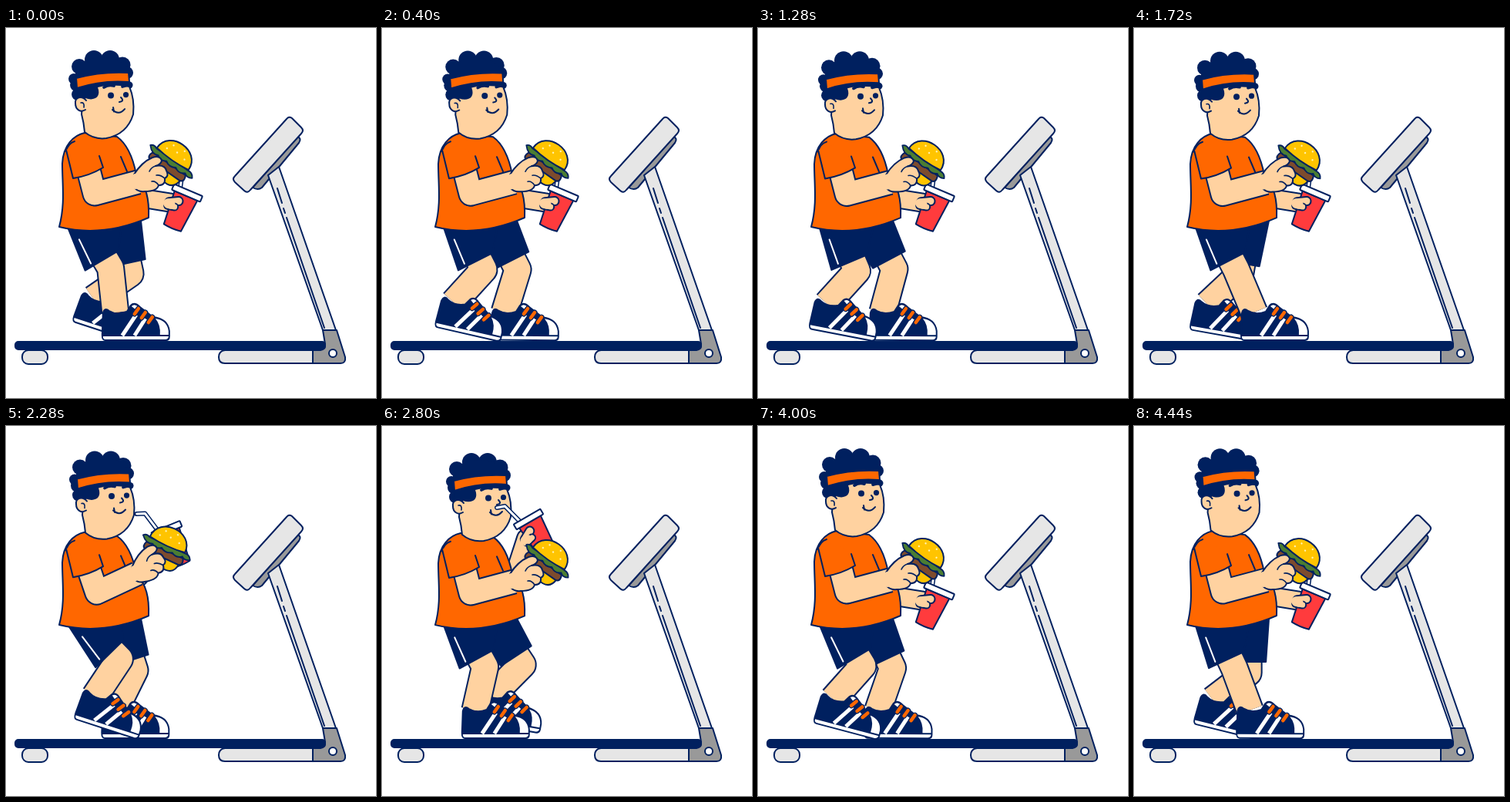
Animation, 480 px wide and 480 px high, one loop 4.48 s. Source, as an HTML page with a canvas:

```html
<!DOCTYPE html>
<html lang="en">
<head>
<meta charset="utf-8">
<title>Treadmill snack</title>
<style>
html, body { margin: 0; height: 100%; overflow: hidden; background: #fff; }
canvas { display: block; width: 100vw; height: 100vh; }
</style>
</head>
<body>
<canvas width="480" height="480"></canvas>
<script>
const ctx = document.querySelector('canvas').getContext('2d');
const LOOP = 4480, STEP = LOOP / 5, GROUND = 405;
const NAVY = '#00205f', ORANGE = '#ff6700', SKIN = '#ffd2a0', PALE = '#e6e6e6',
  GREY = '#999', RED = '#ff3b3d', YELLOW = '#ffc400', GREEN = '#4b7d32', BROWN = '#7d4b2d', WHITE = '#fff';
const THIGH = 62, SHIN = 58;

// phase, heel x, heel tilt in degrees, lift
const FOOT = [[0, 124, 0, 0], [.125, 103, 0, 0], [.25, 81, 0, 0], [.34, 68, 4, 0], [.42, 63, 10, 0],
  [.5, 74, 18, 0], [.545, 83, 18, 1], [.625, 109, 10, 8], [.75, 135, -2, 9], [.85, 143, -6, 3], [.92, 138, 0, 0]];
// phase within one step, head x and y
const HEAD = [[0, 0, 0], [.09, 1, 3.5], [.25, 2, 6], [.5, 0, 5], [.7, -2, 3.5], [.84, -3, 1.7], [.91, -2.5, .3]];

// periodic cubic through the keys
function spline(keys, p) {
  const n = keys.length;
  const key = j => keys[(j + n) % n].map((v, c) => c ? v : v + Math.floor(j / n));
  const i = keys.findLastIndex(k => k[0] <= p);
  const [a, b, c, d] = [i - 1, i, i + 1, i + 2].map(key);
  const h = c[0] - b[0], s = (p - b[0]) / h;
  return b.slice(1).map((v, j) => {
    const k = j + 1;
    const m0 = h * (c[k] - a[k]) / (c[0] - a[0]), m1 = h * (d[k] - b[k]) / (d[0] - b[0]);
    const q = c[k] - v;
    return v + m0 * s + (3 * q - 2 * m0 - m1) * s * s + (m0 + m1 - 2 * q) * s ** 3;
  });
}

const rad = deg => deg * Math.PI / 180;
const mix = (a, b, p) => a + (b - a) * p;
const clamp = x => Math.max(0, Math.min(1, x));
const ease = x => { x = clamp(x); return x * x * (3 - 2 * x); };

function turn([x, y], deg) {
  const c = Math.cos(rad(deg)), s = Math.sin(rad(deg));
  return [x * c - y * s, x * s + y * c];
}

function shape(d, fill, width = 2, color = NAVY) {
  const path = new Path2D(d);
  if (fill) { ctx.fillStyle = fill; ctx.fill(path); }
  if (width) { ctx.lineWidth = width; ctx.strokeStyle = color; ctx.stroke(path); }
}
const poly = pts => 'M' + pts.map(p => p.join()).join('L');
const dot = (x, y, r, fill, width = 0) =>
  shape(`M${x - r},${y}a${r},${r} 0 1 1 ${2 * r},0a${r},${r} 0 1 1 ${-2 * r},0Z`, fill, width);

function limb(pts, width, cap = 'butt') {
  ctx.lineCap = cap;
  shape(poly(pts), null, width + 4);
  shape(poly(pts), null, width, SKIN);
  ctx.lineCap = 'round';
}

function at(x, y, deg, draw) {
  ctx.save();
  ctx.translate(x, y);
  ctx.rotate(rad(deg));
  draw();
  ctx.restore();
}

function box(x, y, w, h, r, fill) {
  const path = new Path2D();
  path.roundRect(x, y, w, h, r);
  ctx.fillStyle = fill; ctx.fill(path);
  ctx.lineWidth = 2; ctx.strokeStyle = NAVY; ctx.stroke(path);
}

function treadmill() {
  shape('M378,141Q384,143 380,149L332,207Q327,211 320,207Z', GREY);
  shape('M340,191L354,180L428,392H411Z', PALE);
  shape('M352,208L358,227M360,234L362,240M364,246L413,389', null);
  shape('M364,118Q367,114 371,117L383,129Q387,133 383,137L317,210Q313,215 309,211L297,200Q293,196 297,192Z', PALE);
  box(21, 418, 33, 18, 8, PALE);
  shape('M398,418V435H284Q276,435 276,427T284,418Z', PALE);
  shape('M398,418H408Q414,417 414,410L411,392H429L440,427Q441,435 434,435H398Z', GREY);
  dot(424, 422, 5, WHITE, 2);
  box(12, 407, 402, 10, 4, NAVY);
}

function shoe() {
  shape('M1,-7L2,-35Q4,-43 10,-38Q20,-32 33,-37L38,-45Q43,-50 50,-43L67,-30Q86,-28 88,-12V-5Q88,0 84,0H5Q1,0 1,-7Z', NAVY);
  shape('M39,-44Q43,-48 48,-43L44,-40Z', WHITE, 0);
  shape('M70,-28Q85,-26 87,-12V-7H76Q77,-20 70,-28Z', WHITE, 0);
  shape('M2,-5H87V-4Q86,-1 83,-1H5Q2,-1 2,-5Z', WHITE, 0);
  ctx.lineCap = 'butt';
  shape('M45,-33L27,-6M57,-28L43,-6', null, 5, WHITE);
  ctx.lineCap = 'round';
  shape('M48,-41L43,-34M57,-36L52,-29M66,-30L61,-23', null, 7);
  shape('M48,-41L43,-34M57,-36L52,-29M66,-30L61,-23', null, 4.5, ORANGE);
}

function leg(phase, hip, shift, waist, back, front, stripe) {
  const [x, tilt, lift] = spline(FOOT, phase);
  const toe = [x + shift + 80, GROUND - lift];
  const off = turn([-62, -36], tilt);
  const ankle = [toe[0] + off[0], toe[1] + off[1]];
  const dx = ankle[0] - hip[0], dy = ankle[1] - hip[1];
  const d = Math.min(Math.hypot(dx, dy), THIGH + SHIN - .1);
  const bend = Math.acos((THIGH ** 2 + d * d - SHIN ** 2) / (2 * THIGH * d));
  const a = Math.atan2(dx, dy) + bend;
  const ux = Math.sin(a), uy = Math.cos(a);
  // along the thigh, then across it towards the front
  const point = (l, w) => [hip[0] + ux * l + uy * w, hip[1] + uy * l - ux * w];

  limb([hip, point(THIGH, 0), ankle], 33);
  at(...toe, tilt, () => { ctx.translate(-80, 0); shoe(); });
  shape(poly([waist[0], point(48, back), point(48, front), waist[1]]) + 'Z', NAVY);
  if (stripe) {
    const [ex, ey] = point(44, -19);
    shape(poly([[mix(86, ex, .37), mix(256, ey, .37)], [ex, ey]]), null, 2, WHITE);
  }
}

function torso() {
  shape('M102,136C88,139 74,152 73,176C73,204 77,228 69,258Q126,272 185,246C186,222 182,205 169,190Q162,154 144,141Z', ORANGE);
  shape('M78,160Q80,150 89,147M149,167L157,186', null);
}

function head() {
  for (const [x, y, r] of [[95, 50, 10], [114, 41, 12], [135, 41, 12], [151, 48, 10.5],
    [157, 58, 8], [88, 66, 7], [91, 74, 8], [93, 86, 8], [160, 74, 4.5]]) dot(x, y, r, NAVY);
  shape('M90,84V55Q100,38 125,38T160,58V80Z', NAVY, 0);
  shape('M99,96L98,112Q101,123 102,135Q114,145 130,143Q157,138 165,112Q167,92 160,76Q140,71 112,76Z', SKIN);
  shape('M92,76Q125,67 161,70V76Q140,71 119,77C124,90 114,95 103,91L93,92Z', NAVY, 0);
  shape('M104,94C98,87 89,90 90,98C90,106 97,110 103,106', SKIN);
  shape('M97,97Q102,96 101,103', null, 1.6);
  shape('M91,65Q124,56 159,58L160,70Q125,67 92,78Z', ORANGE);
  dot(136, 87.5, 4, NAVY);
  dot(155.5, 86.5, 3.6, NAVY);
  shape('M127,77Q133,73 140,75M151,76L160,73.5', null, 3.8);
  shape('M149,90Q154,95 147,96M139,103L140,108.5M138,106Q146,114 154,105', null, 2);
}

function cup() {
  const straw = 'M-11,-3L-18,-30L-28,-33.5';
  shape(straw, null, 6);
  shape(straw, null, 3, WHITE);
  shape('M-16,4L-12,49Q0,51 12,49L16,4Z', RED);
  box(-20, -4, 40, 8, 1, WHITE);
  limb([[-17, 20], [-6, 14]], 9, 'round');
  limb([[-17, 25], [-8, 23]], 7, 'round');
  shape('M-18,22H-14', null, 12, SKIN);
}

function burger() {
  shape('M-24,12H24Q24,26 12,27H-12Q-24,26 -24,12Z', YELLOW);
  shape('M-26,4H26Q30,13 23,14H-23Q-30,12 -26,4Z', BROWN);
  shape('M-34,-2Q-30,-6 -25,-3H25Q32,-4 35,2Q29,6 24,2Q17,8 10,3Q2,8 -5,3Q-12,8 -18,3Q-26,7 -34,-2Z', GREEN, 1.8);
  shape('M-25,-4C-25,-34 25,-34 25,-4Q0,0 -25,-4Z', YELLOW);
  for (const [x, y] of [[-9, -19], [0, -14], [7, -21], [13, -12], [-14, -11]]) dot(x, y, 1.2, '#fff3b0');
}

function hand() {
  shape('M166,190Q176,174 190,168Q200,165 202,172Q201,177 194,179Q206,177 208,185Q212,192 206,195Q207,204 198,204Q196,212 180,212Q170,213 166,206Z', SKIN);
  shape('M194,179Q188,181 186,186M206,195Q200,190 195,191M198,204Q194,198 189,199', null, 1.6);
  shape('M168,193V205', null, 8, SKIN);
}

function nearArm(raise) {
  const deg = -14.5 * raise, elbow = [115 + 4 * raise, 215];
  const wrist = turn([56, -15], deg).map((v, i) => v + elbow[i]);
  limb([[106, 180], elbow, wrist], 29);
  at(...elbow, deg, () => {
    ctx.translate(-115, -215);
    at(214, 173, 35, burger);
    hand();
  });
  shape('M78,158L87,195Q108,192 126,181L121,166L100,150Z', ORANGE, 0);
  shape('M78,158L87,195Q108,192 126,181L121,166', null);
}

function render(time) {
  const t = time % LOOP, phase = t / STEP % 1;
  const [hx, hy] = spline(HEAD, phase * 2 % 1);
  const sip = ease((t - 1900) / 500) * (1 - ease((t - 2960) / 500));
  const raise = Math.sqrt(4 * sip * (1 - sip));
  const cupX = mix(235, 190, sip ** 3.4), cupY = mix(214, 121, sip), cupTilt = mix(23, -30, sip);
  const grip = turn([-15, 20], cupTilt);

  ctx.fillStyle = WHITE;
  ctx.fillRect(0, 0, 480, 480);
  ctx.lineCap = ctx.lineJoin = 'round';
  treadmill();
  leg((phase + .5) % 1, [148, 258], 7, [[110, 256], [175, 250]], -24, 23);
  leg(phase, [104, 258], 0, [[79, 256], [150, 256]], -30, 20, true);
  limb([[172, mix(220, 192, sip)], [cupX + grip[0], cupY + grip[1]]], 22, 'round');

  ctx.save();
  ctx.translate(0, 262);
  ctx.scale(1, 1 - hy / 250);
  ctx.translate(0, -262);
  torso();
  ctx.restore();

  at(hx, hy, 0, head);
  at(cupX, cupY, cupTilt, cup);
  at(0, hy / 3, 0, () => nearArm(raise));
}

const start = performance.now();
function tick() {
  render(performance.now() - start);
  requestAnimationFrame(tick);
}
tick();
</script>
</body>
</html>
```
